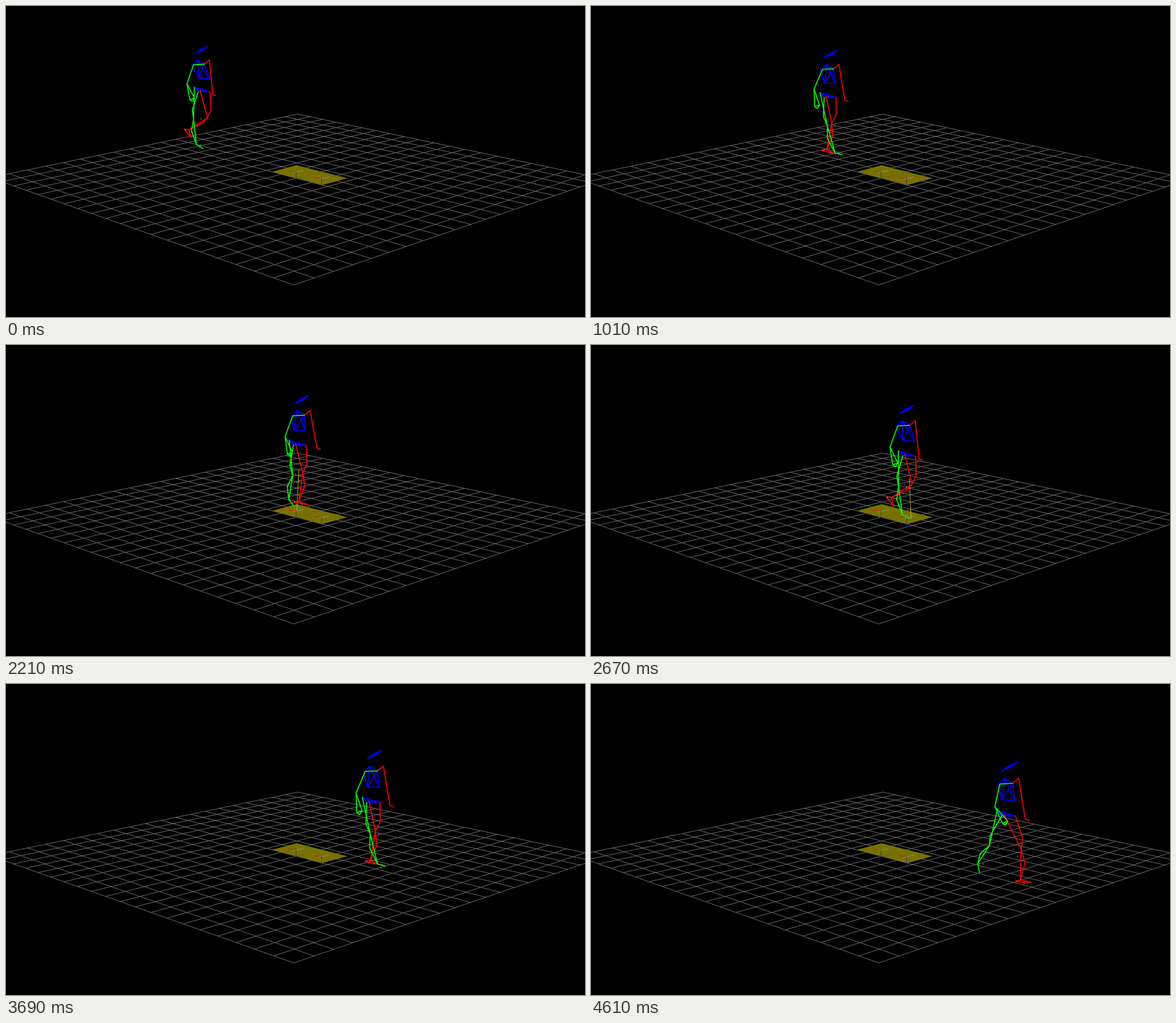
Animation, 1021 px wide and 548 px high, one loop 4660 ms. Source, as an HTML page with a canvas:

```html
<!DOCTYPE html>
<html lang="en">
<head>
<meta charset="utf-8">
<title>Gait capture</title>
<style>
html, body { margin: 0; width: 100%; height: 100%; overflow: hidden; background: #000; }
canvas { display: block; }
</style>
</head>
<body>
<canvas id="stage" width="1021" height="548"></canvas>
<script>
const ctx = document.getElementById('stage').getContext('2d');
const LOOP = 4660, CYCLE = 1350;
const { sin, cos, PI, min } = Math;

// Cosine wave over the gait cycle, highest at phase `peak`
const wave = (phase, peak, times = 1) => cos(2 * PI * times * (phase - peak));
const add = ([x, y], dx, dy) => [x + dx, y + dy];
const mix = ([x, y], [u, v], f) => [x + (u - x) * f, y + (v - y) * f];

function stroke(color, width, ...lines) {
  ctx.strokeStyle = color;
  ctx.lineWidth = width;
  ctx.beginPath();
  for (const line of lines) line.forEach(([x, y], i) => i ? ctx.lineTo(x, y) : ctx.moveTo(x, y));
  ctx.stroke();
}

function fill(color, pts) {
  ctx.fillStyle = color;
  ctx.beginPath();
  pts.forEach(([x, y]) => ctx.lineTo(x, y));
  ctx.fill();
}

// Floor point in perspective, u and v from 0 to 1
function floor(u, v) {
  const a = .6246 * (1 - u - v), b = .5015 * u, c = .4985 * v, w = a + b + c;
  return [(514 * a - 28 * b + 1054 * c) / w, (190 * a + 302 * b + 304 * c) / w];
}

function drawPlate(x, y, axis) {
  fill('#787100', [[x - 43, y], [x, y - 11.5], [x + 44.5, y], [x, y + 12]]);
  stroke('#b03418', 1.3, [[x - 14, y - .5], [x - 3, y]]);
  stroke('#8c9090', 1, [[x - 7, y + 2], [x + 12, y - 2]]);
  stroke('#383848', 1, [[x - 1, y], [x - 1, y + 11]]);
  stroke(axis, 1, [[x - 1, y + 11], [x - 1, y + 18]]);
}

function drawFloor() {
  const n = 20;
  for (let i = 0; i <= n; i++) {
    stroke('#707070', 1, [floor(i / n, 0), floor(i / n, 1)], [floor(0, i / n), floor(1, i / n)]);
  }
  drawPlate(512, 291.5, '#101060');
  drawPlate(557, 303, '#2020a0');
}

// Ground reaction vector while a foot loads a plate
function drawForce(t, start, end, x, y) {
  const p = (t - start) / (end - start);
  if (p <= 0 || p >= 1) return;
  const size = min(1, 4 * sin(PI * p));
  const ox = x + 16 * p, oy = y + 4.5 * p;
  stroke('#d0b048', 1, [[ox, oy], [ox + (24 * p - 12) * size, oy - 70 * size]]);
}

// Leg joints below a hip; side is -1 for left, 1 for right
function makeLeg(hip, side, q) {
  const thigh = -.1 + .33 * wave(q, .79) - .07 * wave(q, 0, 2);
  const shank = -.2 + .46 * wave(q, .95) - .27 * wave(q, .01, 2);
  const foot = .25 - 1.35 * shank;
  const knee = add(hip, 37 * sin(thigh) + side * 5, 49 * cos(thigh) + 5 * sin(thigh));
  const ankle = add(knee, 34 * sin(shank) - side * 6, 45 * cos(shank) + 9 * sin(shank));
  return {
    hip, knee, ankle,
    front: add(hip, -12 - side * 5, -5 + side * 3),
    thighMark: add(mix(hip, knee, .67), side * 5, 0),
    shinMark: add(mix(knee, ankle, .46), side * 6, 0),
    toe: add(ankle, 14 * cos(foot) + side * 2, 13 * sin(foot) + 3 * cos(foot)),
    heel: add(ankle, -8, 3 - 4 * sin(foot))
  };
}

const legLines = g => [
  [g.front, g.knee, g.ankle, g.toe],
  [g.hip, g.thighMark, g.knee, g.shinMark, g.ankle]
];

function drawJointCentres({ knee, ankle }, side) {
  const dots = [add(knee, -side * 12, 0), add(knee, -side * 6, 11), add(ankle, -side * 7, 0), add(ankle, 5, 5)];
  ctx.fillStyle = '#fff';
  for (const [x, y] of dots) ctx.fillRect(x, y, 1, 1);
}

function drawWalker(t) {
  const phase = t / CYCLE;
  const x = 339.5 + .072 * t + 2.6e-6 * t * t - 2.3 * wave(phase, 0);
  const y = 92 + .0121 * t + 8e-7 * t * t + 5 * wave(phase, .13) - 3 * wave(phase, .1, 2);
  const scale = 1 + t * 4e-5;
  const sway = wave(phase, .08), swing = wave(phase, .3);
  const W = 1.8 / scale;

  ctx.save();
  ctx.translate(x, y);
  ctx.scale(scale, scale);

  const neck = [0, 0], back = [-9.7, 10.7], front = [12, 7.5];
  const lowBack = [-1.5 + 4 * sway, 32], lowFront = [17 + 4 * sway, 33];
  const pelvis = [8 + 4 * sway, 56];
  const left = makeLeg(add(pelvis, -10.2, 0), -1, phase);
  const right = makeLeg(add(pelvis, 10.2, 0), 1, phase + .5);

  const head = [[-3.5, -11.5], [7, -19], [18, -24], [10, -17]];
  fill('#00f', head);
  stroke('#00f', W, [...head, head[0]],
    [neck, back, lowBack, lowFront, front, neck, lowBack, front], [neck, lowFront],
    [left.hip, left.front, right.hip, left.hip], [left.front, right.front, right.hip]);

  const shoulder = [21, 0];
  const elbow = add(shoulder, 4.5 - 1.5 * sway, 33);
  const wrist = add(elbow, 4 - 1.5 * sway, 28);
  stroke('#f00', W, ...legLines(right), [right.ankle, right.heel, right.toe],
    [front, shoulder, elbow, wrist, add(wrist, 5.5, 1.8)]);

  const leftShoulder = [-7, 8.5];
  const leftElbow = add(leftShoulder, -10.5 + 4 * swing, 33.5);
  const hand = add(leftElbow, 7 + 6 * swing, 27 - 3 * swing);
  const thumb = add(hand, 8, -3);
  stroke('#0f0', W, ...legLines(left),
    [front, leftShoulder, leftElbow, hand, thumb, leftElbow], [hand, add(hand, 4, 3), thumb]);

  drawJointCentres(left, -1);
  drawJointCentres(right, 1);
  ctx.restore();
}

function frame(now) {
  const t = (now - begin) % LOOP;
  ctx.setTransform(1, 0, 0, 1, .5, .5);
  ctx.fillStyle = '#000';
  ctx.fillRect(-1, -1, 1023, 550);
  drawFloor();
  drawForce(t, 1720, 2480, 502, 287);
  drawForce(t, 2340, 3230, 558, 303);
  drawWalker(t);
  requestAnimationFrame(() => frame(performance.now()));
}

ctx.lineJoin = ctx.lineCap = 'round';
const begin = performance.now();
frame(begin);
</script>
</body>
</html>
```
